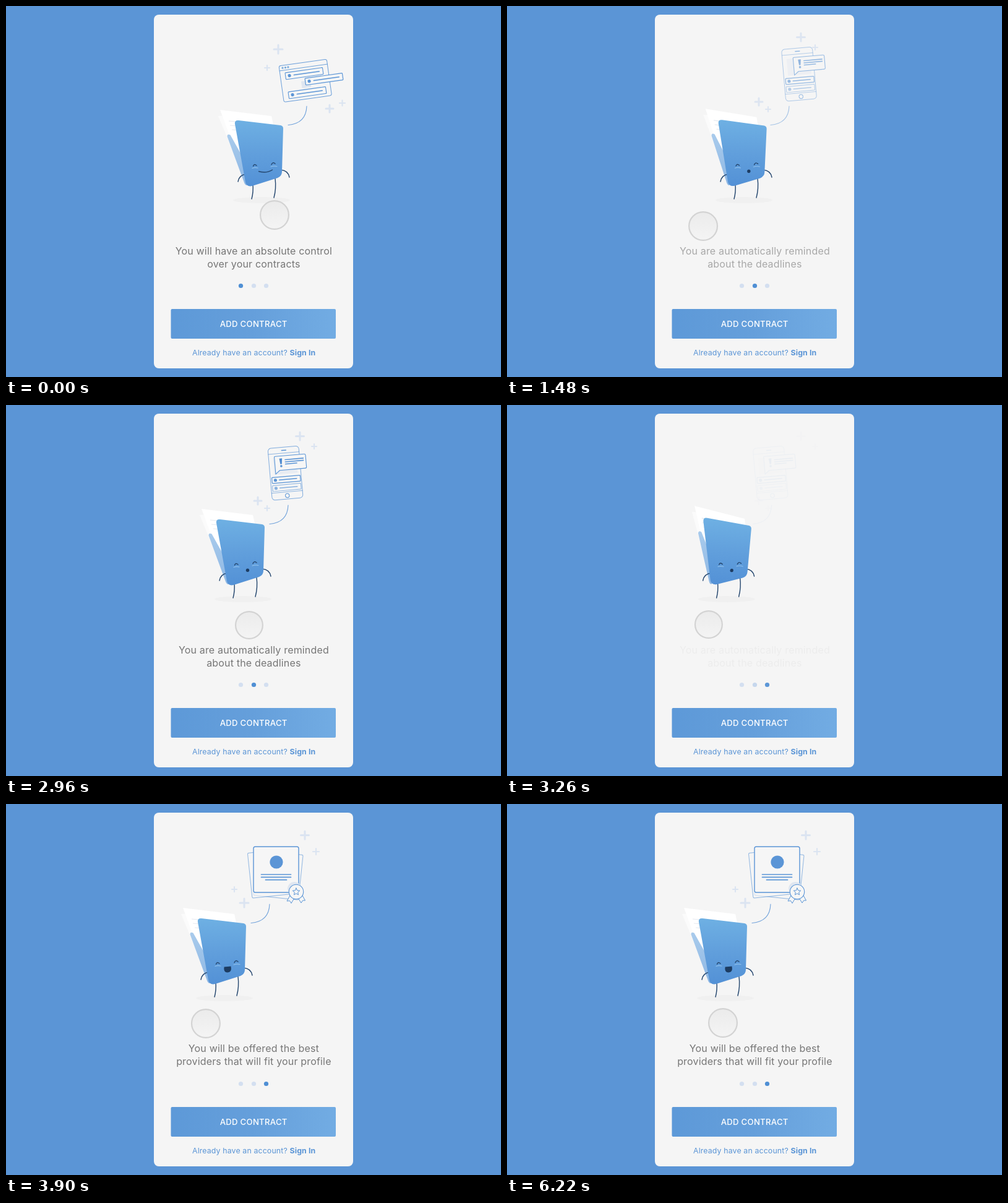
Animation, 800 px wide and 600 px high, one loop 6.24 s. Source, as an HTML page:

```html
<!DOCTYPE html>
<html lang="en">
<head>
<meta charset="utf-8">
<title>Onboarding</title>
<style>
  html, body { margin: 0; width: 100%; height: 100%; overflow: hidden; background: #5b95d6; }
  svg { display: block; width: 800px; height: 600px; }
  text { font-family: Inter, "Open Sans", sans-serif; text-anchor: middle; }
  .copy { font-size: 16px; letter-spacing: .17px; fill: #767676; }
  .line { fill: none; stroke: #5b95d6; stroke-linecap: round; stroke-linejoin: round; }
  .ink { fill: none; stroke: #24466e; stroke-width: 1.4; stroke-linecap: round; }
  .soft { fill: none; stroke: #8fc0ec; stroke-width: 1.1; stroke-linecap: round; }
  .plus { fill: none; stroke: #dbe4f1; stroke-linecap: round; }
</style>
</head>
<body>
<svg viewBox="0 0 800 600">
  <defs>
    <linearGradient id="cover" x1="0" y1="0" x2="0" y2="1">
      <stop offset="0" stop-color="#6eb0e3"/><stop offset=".5" stop-color="#619fdc"/>
      <stop offset="1" stop-color="#5391d6"/>
    </linearGradient>
    <linearGradient id="button">
      <stop offset="0" stop-color="#5d99d8"/><stop offset=".5" stop-color="#659fdb"/>
      <stop offset="1" stop-color="#72ace3"/>
    </linearGradient>
    <linearGradient id="spine" x1="0" y1="0" x2="0" y2="1">
      <stop offset="0" stop-color="#a9cbec"/><stop offset="1" stop-color="#8db7e4"/>
    </linearGradient>
    <linearGradient id="touch" x1="0" y1="0" x2="0" y2="1">
      <stop offset="0" stop-color="#ebebeb"/><stop offset="1" stop-color="#f4f4f4"/>
    </linearGradient>
  </defs>

  <rect width="800" height="600" fill="#5b95d6"/>
  <rect x="239" y="14" width="322" height="572" rx="8" fill="#f5f5f5"/>

  <g id="pages"></g>

  <g id="hero">
    <ellipse cx="413" cy="314" rx="46" ry="5" fill="#f0f0f0"/>
    <path id="tail" class="line" d="M456 192.500Q485 190 486 162" stroke-width="1.100"/>
    <path class="ink" d="M399 288Q400 301 397 312M435 279Q437 295 433 310"/>
    <g id="sheets">
      <path d="M343 178L372 176L410 280L387 284Z" fill="#fbfbfb"/>
      <path d="M346 168L429 178L433 196L400 282L388 282Z" fill="#fff"/>
      <path d="M360 186L371 187M362 193L373 194M365 200L375 201" stroke="#e6eaf0" stroke-width="1.200"/>
      <path d="M357.500 211Q357.500 206 362.500 208.500L379 238L396 284L389 290Q386 290 384 283Z" fill="url(#spine)"/>
    </g>
    <path class="ink" d="M388 272Q377 273 375 284M444 265Q456 266 458 277"/>
    <g id="front">
      <path d="M376 185L444 193Q448 194 448 198L446 268Q446 275 439 278L398 291Q389 293 387 285L370 191Q369 184 376 185Z" fill="url(#cover)"/>
      <path class="ink" d="M399.500 259Q401 254.500 405 258M429 256.500Q431 251.500 435 255"/>
      <path class="soft" d="M398 262.500Q402 260.500 407 262M428 260Q433 258 438 259.500"/>
      <g id="mouths">
        <path class="ink" d="M408.500 267.500Q421 271 430.500 265"/>
        <circle cx="420.500" cy="267.200" r="2.700" fill="#1d3c62"/>
        <path d="M412.500 263.500L423.500 262.500Q425.500 272 418 272.500Q411 272.500 412.500 263.500Z" fill="#1d3c62"/>
      </g>
    </g>
  </g>

  <g id="dots"></g>
  <rect x="266.500" y="490" width="266.500" height="48" rx="2" fill="url(#button)"/>
  <text x="400.200" y="519" font-size="13.200" font-weight="500" letter-spacing=".25" fill="#fff">ADD CONTRACT</text>
  <text x="400.700" y="565" font-size="12.350" letter-spacing=".13" fill="#5b95d6">Already have an account? <tspan font-weight="700">Sign In</tspan></text>
  <circle id="finger" fill="url(#touch)" stroke="#d3d3d3" stroke-width="2.200"/>
</svg>

<script>
const LOOP = 6240, STEP = 30, SWIPES = [1000, 2980];
const OUT = 300, ENTER = 600;
const $ = id => document.getElementById(id);
const clamp = v => Math.max(0, Math.min(1, v));
const mix = (a, b, k) => a + (b - a) * k;
const smooth = k => k * k * (3 - 2 * k);

// Drawing helpers
const path = (d, w, extra = '') => `<path class="line" d="${d}" stroke-width="${w}" ${extra}/>`;
const box = (x, y, w, h, r, sw, extra = '') =>
  `<rect class="line" x="${x}" y="${y}" width="${w}" height="${h}" rx="${r}" stroke-width="${sw}" ${extra}/>`;
const disc = (x, y, r, fill = '#5b95d6') => `<circle cx="${x}" cy="${y}" r="${r}" fill="${fill}"/>`;
const at = (x, y, a, body) => `<g transform="translate(${x} ${y}) rotate(${a})">${body}</g>`;
const PAPER = 'style="fill:#f6f6f6"';
const SHADE = '#dfe6f0';

const row = (x, y, a, w, h, sw, op = 1) => at(x, y, a,
  `<g opacity="${op}">` + box(0, 0, w, h, 1, sw, PAPER) + disc(h * .58, h / 2, 2.6) +
  path(`M${h * 1.25} ${h / 2}H${w - 6}`, 1.6) + '</g>');

function windowArt() {
  const back = at(441, 97, -8,
    box(0, 0, 78, 59, 3, 1, 'opacity=".9"') + path('M0 8H78', .9, 'opacity=".9"') +
    [5.5, 10, 14.5].map(x => disc(x, 4, 1.6, '#7badde')).join('')) +
    row(451, 108, -8, 61, 11, 1.1) + row(456, 139, -8, 61, 11, 1.1) +
    at(477, 122, -8, `<rect width="15" height="11" rx="1" fill="${SHADE}"/>`);
  return [back, row(483, 117, -8, 61, 11, 1.2)];
}

function phoneArt() {
  const back = at(423, 70.5, -5,
    box(0, 0, 50, 84, 5, 1, 'opacity=".75"') + path('M0 9.500H50M0 72.500H50', .9, 'opacity=".7"') +
    path('M22 5H29', 1.4) + `<circle class="line" cx="25" cy="78.500" r="3.200" stroke-width="1"/>` +
    `<rect x="7" y="16" width="38" height="27" fill="${SHADE}" opacity=".6"/>`) +
    row(429.5, 117.5, -5, 46, 9.5, 1.2) + row(430.5, 130.5, -5, 46, 9.5, 1, .7);
  const card = at(433, 83.5, -5,
    path('M2 0H49Q51 0 51 2V21Q51 23 49 23H7.500L.500 28.500V2Q0 0 2 0Z', 1.1, PAPER) +
    '<path d="M8.200 4H12.800L11.700 13H9.300Z" fill="#4f8bd0"/>' + disc(10.5, 16.3, 1.8) +
    path('M17.500 6.500H47M17.500 10H47M17.500 13.500H36', 1.6));
  return [back, card];
}

function certificateArt() {
  const sheet = (x, y, a) => at(x, y, a, box(-36.5, -36.5, 73, 73, 2, 1, `opacity=".65" ${PAPER}`));
  const back = sheet(440, 115, 6) + sheet(430.5, 112, -6) +
    box(400, 69, 73, 74, 3, 1.4, PAPER) + disc(437, 94, 10.6) +
    path('M412.500 114H460.500M412.500 118.300H460.500M419.500 122.700H453.500', 1.7) +
    disc(466, 137, 11, SHADE);
  const star = Array.from({ length: 10 }, (_, i) => {
    const a = (i * 36 - 90) * Math.PI / 180, r = i % 2 ? 2.8 : 6;
    return `${469 + r * Math.cos(a)} ${142 + r * Math.sin(a)}`;
  }).join('L');
  const badge = path('M459 148L454 157L458.500 156.500L461 160.500L466 152M479 148L483.500 156L479.500 156L477 160L472 152', 1, PAPER) +
    `<circle class="line" cx="469" cy="142" r="11.700" stroke-width="1.100" ${PAPER}/>` +
    path(`M${star}Z`, 1);
  return [back, badge];
}

const PAGES = [
  { art: windowArt(), y: 402, copy: ['You will have an absolute control', 'over your contracts'],
    plus: [[440, 70, 7], [422, 100, 4], [523, 166, 6], [543.5, 157, 4.5]] },
  { art: phoneArt(), y: 402, copy: ['You are automatically reminded', 'about the deadlines'],
    plus: [[475, 50.5, 6.5], [498, 67, 4], [407, 155, 6], [422, 167, 4]] },
  { art: certificateArt(), y: 401, copy: ['You will be offered the best', 'providers that will fit your profile'],
    plus: [[483, 50.5, 6.5], [501, 77, 5], [385, 160, 7], [369, 138, 4]] }
];

const plus = ([x, y, s]) =>
  `<path class="plus" stroke-width="${s > 5 ? 3 : 2.2}" d="M${x - s} ${y}h${2 * s}M${x} ${y - s}v${2 * s}"/>`;

$('pages').innerHTML = PAGES.map(p => `<g>
  <g>${p.plus.map(plus).join('')}</g>
  <g><g>${p.art[0]}</g><g>${p.art[1]}</g></g>
  <g class="copy">${p.copy.map((s, i) => `<text x="400.400" y="${p.y + i * 21}">${s}</text>`).join('')}</g>
</g>`).join('');
$('dots').innerHTML = [379.5, 400.5, 420.5].map(x =>
  disc(x, 452.5, 3.6, '#d3dff0') + disc(x, 452.5, 3.6, '#4f8fd4')).join('');

const pages = [...$('pages').children];
const marks = [...$('dots').children].filter((_, i) => i % 2);
const mouths = [...$('mouths').children];

// time, x, y, eased
const TOUCH = [
  [60, 434, 338], [560, 393, 356, 1], [1000, 393, 356], [1280, 326, 355], [1360, 316, 356],
  [1480, 317, 356], [1960, 354, 354.5], [2240, 371, 354], [2580, 392, 356], [2980, 393, 356],
  [3260, 326, 355], [3320, 321, 355], [3880, 322, 355], [4500, 349, 354]
];

function touchAt(t) {
  const i = TOUCH.findIndex(k => k[0] > t);
  if (i === 0) return TOUCH[0].slice(1, 3);
  if (i < 0) return TOUCH[TOUCH.length - 1].slice(1, 3);
  const a = TOUCH[i - 1], b = TOUCH[i];
  let k = (t - a[0]) / (b[0] - a[0]);
  if (b[3]) k = smooth(k);
  return [mix(a[1], b[1], k), mix(a[2], b[2], k)];
}

function drawPage(i, t) {
  const into = i ? t - SWIPES[i - 1] - OUT : ENTER;
  const leave = i < 2 ? clamp((t - SWIPES[i]) / OUT) : 0;
  const alpha = clamp(into / 300) * (1 - leave);
  const late = 42 * (1 - clamp(into / ENTER)) ** 2;
  const gone = smooth(leave);
  const [stars, art, copy] = pages[i].children;
  const [back, top] = art.children;
  stars.setAttribute('opacity', clamp(into / 200) * (1 - leave));
  art.setAttribute('opacity', alpha);
  copy.setAttribute('opacity', alpha);
  back.setAttribute('transform', `translate(${late - 26 * gone} 0)`);
  top.setAttribute('transform', `translate(${late * 1.4 - 19 * gone} 0)`);
  return alpha;
}

function render(t) {
  let x = 0, lean = 0, press = 0, page = 0;
  const lit = [1, 0, 0];
  SWIPES.forEach((s, i) => {
    const d = t - s;
    x -= STEP * (1 - Math.cos(Math.PI * clamp(d / 330))) / 2;
    lean += d < 280 ? smooth(clamp(d / 280)) : (1 - clamp((d - 280) / 620)) ** 3;
    press += clamp((d + 300) / 120) * (1 - clamp((d - 300) / 120));
    if (d >= OUT) page = i + 1;
    const k = clamp((d - 100) / 200);
    lit[i] *= 1 - k;
    lit[i + 1] = k;
  });

  const alphas = PAGES.map((_, i) => drawPage(i, t));
  $('tail').setAttribute('opacity', .85 * Math.max(...alphas));
  $('hero').setAttribute('transform', `translate(${x} 0)`);
  $('front').setAttribute('transform', `rotate(${3.5 * lean} 415 285)`);
  $('sheets').setAttribute('transform', `rotate(${7.5 * lean} 390 285)`);
  mouths.forEach((m, i) => m.setAttribute('opacity', +(i === page)));
  marks.forEach((m, i) => m.setAttribute('opacity', lit[i]));

  const [cx, cy] = touchAt(t);
  const finger = $('finger');
  finger.setAttribute('cx', cx);
  finger.setAttribute('cy', cy);
  finger.setAttribute('r', 22.9 - press);
}

function tick() {
  render(performance.now() % LOOP);
  requestAnimationFrame(tick);
}
tick();
</script>
</body>
</html>
```
